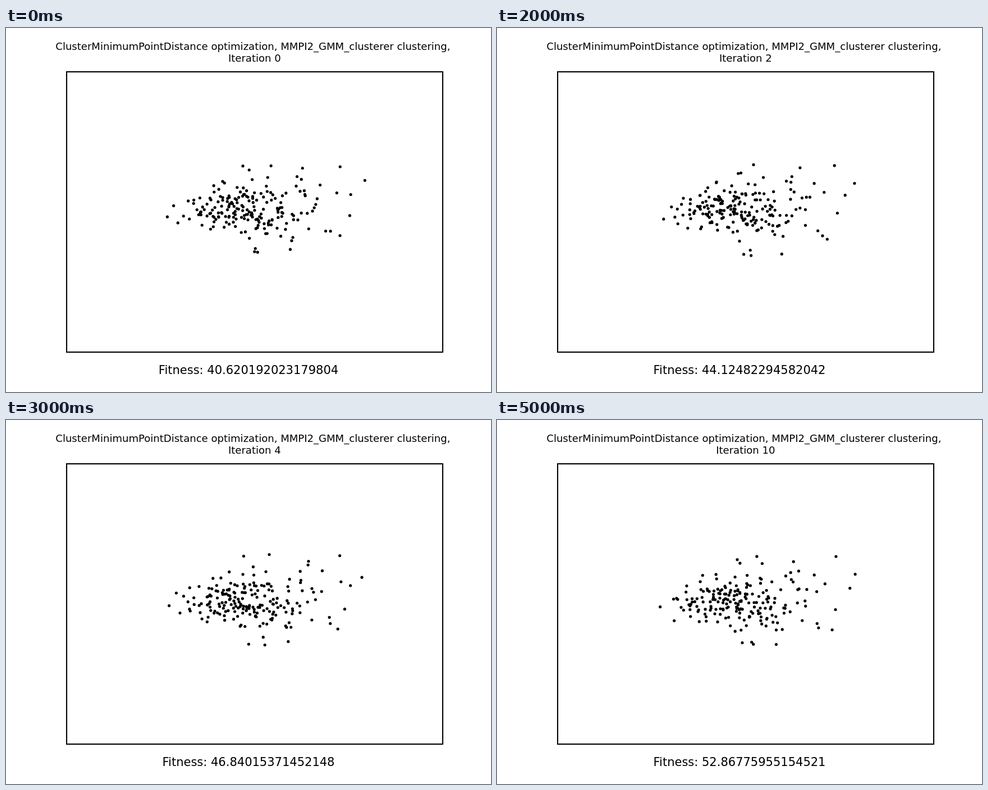
Recreate the animation shown at these times as an HTML page. Size 864 by 648 pixels, loop 6 s.

```html
<!DOCTYPE html>
<html lang="en">
<head>
<meta charset="utf-8">
<title>Clustering iterations</title>
<style>
  html, body { margin: 0; width: 100%; height: 100%; overflow: hidden; background: #fff; }
  svg { display: block; width: 864px; height: 648px; }
  text { font-family: "DejaVu Sans", sans-serif; text-anchor: middle; }
  .title { font-size: 18.056px; }
  .fitness { font-size: 21px; }
</style>
</head>
<body>
<svg viewBox="0 0 864 648">
  <rect width="864" height="648" fill="#fff"/>
  <text class="title" x="439.9" y="39">ClusterMinimumPointDistance optimization, MMPI2_GMM_clusterer clustering,</text>
  <text class="title" id="iteration" x="442.8" y="60"></text>
  <path id="dots" fill="none" stroke="#000" stroke-width="5.2" stroke-linecap="round"/>
  <rect x="108" y="78" width="670" height="499" fill="none" stroke="#000" stroke-width="2.1"/>
  <text class="fitness" id="fitness" x="432" y="616"></text>
</svg>
<script>
const STEP = 1000;
const COUNT = 192;

const steps = [
  { iteration: 0, fitness: '40.620192023179804' },
  { iteration: 1, fitness: '42.391036788453285' },
  { iteration: 2, fitness: '44.12482294582042' },
  { iteration: 4, fitness: '46.84015371452148' },
  { iteration: 8, fitness: '48.938737212968626' },
  { iteration: 10, fitness: '52.86775955154521' }
];

// A few points that hold the outline of the cloud.
const rim = [[598, 243], [622, 297], [595, 370], [436, 402], [457, 403], [428, 250], [533, 250]];

function seeded(seed) {
  return () => {
    seed = (seed + 0x6D2B79F5) | 0;
    let t = Math.imul(seed ^ (seed >>> 15), 1 | seed);
    t = (t + Math.imul(t ^ (t >>> 7), 61 | t)) ^ t;
    return ((t ^ (t >>> 14)) >>> 0) / 4294967296;
  };
}

// Bounded bell curve: the sum of three uniform values.
const bell = (rand, mean, sd) => mean + 2 * sd * (rand() + rand() + rand() - 1.5);

// Approximate normal quantile.
const quantile = u => (u ** 0.135 - (1 - u) ** 0.135) / 0.1975;

// Evenly ranked in x with a longer right tail; the spread in y grows to the right.
function makeCloud() {
  const rand = seeded(5);
  const points = Array.from({ length: COUNT }, (_, i) => {
    const z = quantile((i + 0.5) / COUNT);
    const x = 430 + 62 * z + 4.5 * z * z;
    return [x, bell(rand, 325, 26 + 0.07 * (x - 420))];
  });
  return points.concat(rim);
}

const cloud = makeCloud();

// Every step shakes the whole cloud a little.
function dotPath(step) {
  const rand = seeded(100 + step);
  return cloud.map(([x, y]) =>
    `M${bell(rand, x, 5).toFixed(1)} ${bell(rand, y, 4).toFixed(1)}h0`).join('');
}

const paths = steps.map((_, i) => dotPath(i));
const byId = id => document.getElementById(id);
let shown = -1;

function draw(time) {
  const i = Math.floor(time / STEP) % steps.length;
  if (i === shown) return;
  shown = i;
  byId('iteration').textContent = `Iteration ${steps[i].iteration}`;
  byId('fitness').textContent = `Fitness: ${steps[i].fitness}`;
  byId('dots').setAttribute('d', paths[i]);
}

const start = performance.now();
function tick() {
  draw(performance.now() - start);
  requestAnimationFrame(tick);
}
tick();
</script>
</body>
</html>
```
